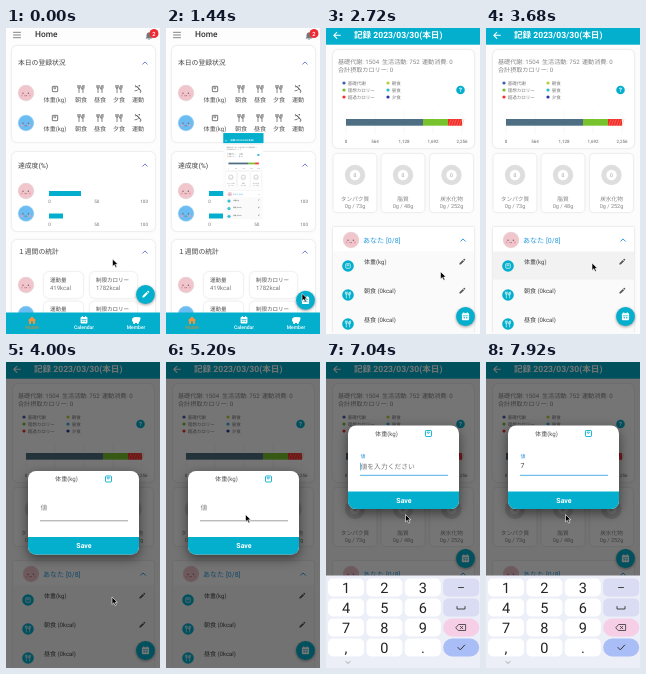
These frames come from a looping animation (154x306 px, 8 s). An HTML page:

```html
<!DOCTYPE html>
<html lang="ja">
<head>
<meta charset="utf-8">
<style>
  html, body { margin: 0; width: 100%; height: 100%; overflow: hidden; background: #fdfdfd; }
  svg { display: block; width: 100vw; height: 100vh; }
  text { font-family: Roboto, "Noto Sans CJK JP", "Noto Sans CJK", sans-serif; text-rendering: geometricPrecision; }
  .card { fill: #fff; filter: drop-shadow(0 .5px 1.2px rgba(0,0,0,.16)); }
  .sheet { fill: #fff; filter: drop-shadow(0 4px 6px rgba(0,0,0,.5)); }
  .fab { filter: drop-shadow(0 1.2px 1.5px rgba(0,0,0,.4)); }
</style>
</head>
<body>
<svg id="stage" viewBox="0 0 154 306"></svg>
<script>
const CYAN = '#03afcd', INK = '#444', GREY = '#858585', BLUE = '#2a9be0';

const text = (x, cy, str, size, fill = INK, anchor = 'start', weight = 400) =>
  `<text x="${x}" y="${cy + size * .36}" font-size="${size}" fill="${fill}" text-anchor="${anchor}" font-weight="${weight}">${str}</text>`;
const mid = (x, cy, str, size, fill, weight) => text(x, cy, str, size, fill, 'middle', weight);
const rect = (x, y, w, h, fill, r = 0) => `<rect x="${x}" y="${y}" width="${w}" height="${h}" rx="${r}" fill="${fill}"/>`;
const card = (x, y, w, h, r = 5) => `<rect class="card" x="${x}" y="${y}" width="${w}" height="${h}" rx="${r}"/>`;
const dot = (x, y, r, fill) => `<circle cx="${x}" cy="${y}" r="${r}" fill="${fill}"/>`;
const line = (d, color, w = 1) =>
  `<path d="${d}" fill="none" stroke="${color}" stroke-width="${w}" stroke-linecap="round" stroke-linejoin="round"/>`;
const at = (x, y, body, scale = 1) => `<g transform="translate(${x} ${y}) scale(${scale})">${body}</g>`;
const group = (id, body) => `<g id="${id}">${body}</g>`;

const chevron = (x, y, color) => line(`M${x - 2.3} ${y + 1.2}l2.3 -2.3l2.3 2.3`, color, 1);
const avatar = (x, y, fill, ring) => at(x, y,
  dot(0, 0, 8.2, ring) + dot(0, 0, 7.5, fill) + dot(-3, .2, .7, '#76606a') + dot(2.4, .2, .7, '#76606a') +
  dot(-4.3, 2.6, 1, '#f0a0ac') + dot(3.8, 2.6, 1, '#f0a0ac') + line('M-1.3 2.6q1 .9 2 0', '#76606a', .6));
const pinkFace = (x, y) => avatar(x, y, '#f1c5cc', '#ead6d9');
const blueFace = (x, y) => avatar(x, y, '#6bbcf1', '#aed8f4');

const icons = {
  scale: c => `<rect x="-3" y="-3" width="6" height="6" rx=".7" fill="none" stroke="${c}" stroke-width=".9"/>` +
    line('M-1.2 -1.4h2.4l-1.2 1.4z', c, .7),
  meal: c => line('M-2.2 4V-4M-3.5 -4v2.2q0 1 1.3 1t1.3 -1V-4', c, .8) + line('M2.2 4V-4q-1.6 1.2 -1.6 4h1.6M3.4 -4v3', c, .8),
  sport: c => dot(1.4, -3.6, .9, c) + line('M-3 -2.5l2.6 0l1.4 2.2l-2 2l-2.5 .3M1 -.3l1.6 1.8v2.5M-3 -4l6.5 6', c, .8),
  pencil: c => `<path d="M-3 3v-1.5l4 -4l1.5 1.5l-4 4zM1.5 -3l.7 -.7q.5 -.3 .9 .1l.5 .5q.4 .4 .1 .9l-.7 .7z" fill="${c}"/>`,
  calendar: c => rect(-3.6, -3.2, 7.2, 7, c, .8) + rect(-2.2, -4.2, 1, 1.5, c) + rect(1.2, -4.2, 1, 1.5, c) +
    rect(-2.7, -1, 5.4, .7, CYAN) + rect(-1.9, .6, 1.3, 1.3, CYAN) + rect(.6, .6, 1.3, 1.3, CYAN),
};
const icon = (name, x, y, color, scale) => at(x, y, icons[name](color), scale);

function homePage() {
  const accent = '#6b78d8';
  const labels = ['体重(kg)', '朝食', '昼食', '夕食', '運動'], xs = [49, 75, 94, 113, 132];
  const kinds = ['scale', 'meal', 'meal', 'meal', 'sport'];
  const statusRow = dy => labels.map((s, i) =>
    icon(kinds[i], xs[i], 61 + dy, '#555', .9) + mid(xs[i], 72 + dy, s, 6.1, '#555')).join('');
  const goal = (y, w) => rect(43, y - 1, w, 5, CYAN) +
    [0, 50, 100].map((n, i) => mid(43.5 + i * 47.3, y + 9.5, n, 4.6, '#777')).join('');
  const stat = (x, y, w, name, value) =>
    card(x, y - 8, w, 26, 5) + text(x + 6, y, name, 5.5, '#555') + text(x + 6, y + 8.3, value, 6, '#777');
  const statRow = y => stat(38, y, 39, '運動量', '419kcal') + stat(84, y, 47, '制限カロリー', '1782kcal');
  const tab = (x, name, art, color) => art + mid(x, 299.5, name, 5, color, 500);
  return rect(0, 0, 154, 306, '#fdfdfd') +
    line('M7.5 4.3h7M7.5 7h7M7.5 9.7h7', '#777', .9) + text(29, 6.2, 'Home', 8.4, '#333', 'start', 500) +
    `<path d="M139.5 10.5l1 -1.2v-2.5q.3 -2.3 2.5 -2.6q2.2 .3 2.5 2.6v2.5l1 1.2zM142 11h2q-1 1.6 -2 0z" fill="#777"/>` +
    dot(148, 5.5, 4.5, '#ee2a34') + mid(148, 5.5, '2', 5.8, '#fff', 500) +
    card(6, 18, 143, 96) + text(12, 35, '本日の登録状況', 6.8) + chevron(139, 35, accent) +
    pinkFace(20, 65) + statusRow(0) + blueFace(20, 95) + statusRow(29) +
    card(6, 124, 143, 79) + text(12, 137.5, '達成度(%)', 6.8) + chevron(139, 137, accent) +
    pinkFace(20, 163) + goal(164, 32) + blueFace(20, 185.5) + goal(186.5, 14) +
    card(6, 212, 143, 110) + text(12, 224, '１週間の統計', 6.8) + chevron(139, 224, accent) +
    pinkFace(20, 257) + statRow(252) + blueFace(20, 286) + statRow(281.5) +
    rect(0, 284.5, 154, 22, CYAN) +
    tab(26, 'Home', `<path d="M21.8 292.5l4.2 -4l4.2 4h-1.2v3.4h-2v-2.3h-2v2.3h-2v-3.4z" fill="#f0943c"/>`, '#c98a3e') +
    tab(78, 'Calendar', icon('calendar', 78, 292, '#fff', .95), '#fff') +
    tab(130, 'Member', `<ellipse cx="130" cy="292" rx="4" ry="3" fill="#fff"/>` + rect(127.3, 293, 1.6, 3, '#fff') +
      rect(131, 293, 1.6, 3, '#fff') + dot(133, 290.5, 1.6, '#fff'), '#fff');
}

function recordPage() {
  const legend = (x, y, name, color) => dot(x, y, 1.6, color) + text(x + 3.7, y, name, 4.5, '#777');
  const nutrient = (x, name, amount) => card(x - 21.5, 126, 43, 58, 4) +
    `<circle cx="${x}" cy="147" r="7.7" fill="none" stroke="#dedede" stroke-width="5"/>` +
    mid(x, 147, '0', 5, '#999') + mid(x, 171, name, 5.7, GREY) + mid(x, 178.3, amount, 5.5, GREY);
  const entry = (y, name, kind) => dot(22, y + 4, 5.8, CYAN) + icon(kind, 22, y + 4, '#fff', .75) +
    text(38, y, name, 6, INK) + icon('pencil', 136, y, '#555', .85);
  const ticks = ['0', '564', '1,128', '1,692', '2,256'];
  let hatch = '';
  for (let x = 123; x < 136; x += 2.6) hatch += line(`M${x} 97l2 -5.4`, '#ff9a94', .5);
  // The page begins above the visible stage, behind the status bar.
  return rect(0, -22, 154, 328, '#fcfcfc') + rect(0, -22, 154, 38.7, CYAN) +
    line('M14.3 7.3h-6.4M10.8 4.3l-3 3l3 3', '#fff', 1.1) + text(28, 7.1, '記録 2023/03/30(本日)', 8.6, '#fff', 'start', 700) +
    card(7, 22, 141, 98) +
    text(12, 33.5, '基礎代謝: 1504', 6.1, GREY) + text(56, 33.5, '生活活動: 752', 6.1, GREY) +
    text(96, 33.5, '運動消費: 0', 6.1, GREY) + text(12, 42, '合計摂取カロリー: 0', 6.1, GREY) +
    legend(18, 55, '基礎代謝', '#3f5fa8') + legend(18, 62, '理想カロリー', '#72bd2f') + legend(18, 69, '超過カロリー', '#f03030') +
    legend(62, 55, '朝食', '#b9cf3a') + legend(62, 62, '昼食', '#27b5d8') + legend(62, 69, '夕食', '#2637a8') +
    dot(134.5, 62, 4.3, CYAN) + mid(134.5, 62.1, '?', 6, '#fff', 700) +
    ticks.map((s, i) => line(`M${20 + i * 29} 83v23`, '#eee', .5) + mid(20 + i * 29, 113, s, 4.5, '#666')).join('') +
    rect(20, 91, 77, 6.7, '#4e6e84') + rect(97, 91, 25, 6.7, '#78c22e') + rect(122, 91, 14, 6.7, '#f22b25') + hatch +
    nutrient(29, 'タンパク質', '0g / 73g') + nutrient(77, '脂質', '0g / 48g') + nutrient(125.5, '炭水化物', '0g / 252g') +
    card(7, 199, 141, 106, 0) + rect(7, 223.5, 141, 82.5, '#fafafa') + group('press', rect(7, 223.5, 141, 28, '#000')) +
    pinkFace(25, 212) + text(37, 212, 'あなた', 7, BLUE) + text(60, 212, '[0/8]', 7, BLUE) + chevron(137, 212, BLUE) +
    entry(234, '体重(kg)', 'scale') + entry(263, '朝食 (0kcal)', 'meal') + entry(292, '昼食 (0kcal)', 'meal');
}

function dialogBox() {
  return `<rect class="sheet" x="22" y="109" width="111" height="83.5" rx="8"/>` +
    `<path d="M22 175h111v9.5a8 8 0 0 1 -8 8h-95a8 8 0 0 1 -8 -8z" fill="${CYAN}"/>` +
    mid(60.5, 117, '体重(kg)', 6.1, '#555') + icon('scale', 102.5, 117, CYAN, 1) +
    group('idle', text(34.5, 146, '値', 6.8, GREY)) +
    group('active', text(34.5, 139.5, '値', 5, BLUE)) +
    group('hint', text(34.5, 150, '値を入力ください', 6.8, '#777') + rect(34, 146.3, .7, 7.5, BLUE)) +
    group('typed', text(34.5, 149.3, '7', 7, INK)) +
    `<path id="underline" d="M34 158.8h88" stroke-width=".8"/>` +
    mid(78, 183.5, 'Save', 7, '#fff', 700);
}

function keyboard() {
  const rows = ['123–', '456␣', '789⌫', ',0.✓'];
  const special = ['#d9dcf3', '#d9dcf3', '#f6cfe6', '#a9bdf7'];
  const art = [
    line('M132.5 0h5', '#333', .9),
    line('M131 -1v2.5h8v-2.5', '#333', .9),
    line('M130 0l2.6 -3h7v6h-7zM134.3 -1.2l2.5 2.5M136.8 -1.2l-2.5 2.5', '#333', .8),
    line('M132 0l2.3 2.4l4.3 -4.8', '#333', 1),
  ];
  const keys = rows.map((row, r) => at(0, 225.5 + r * 20, [...row].map((ch, c) => {
    const x = 20 + c * 38.4;
    return rect(x - 18, -9, 36, 18, c == 3 ? special[r] : '#fff', c == 3 && r > 1 ? 9 : 5) +
      (c == 3 ? art[r] : mid(x, 0, ch, 14.5, '#222'));
  }).join(''))).join('');
  return rect(0, 213.5, 154, 95, '#eceef8') + group('keyCaps', keys) + line('M20 299.5l2 2l2 -2', '#888', .7);
}

const stage = document.getElementById('stage');
stage.innerHTML = homePage() + group('record', recordPage()) +
  group('fab', `<circle class="fab" r="9.4" fill="${CYAN}"/>` +
    group('edit', icons.pencil('#fff')) + group('dates', icons.calendar('#fff'))) +
  group('shade', rect(0, 0, 154, 306, '#000')) + group('dialog', dialogBox()) + group('keys', keyboard()) +
  group('cursor', `<path d="M0 0v7.4l1.8 -1.6l1.3 2.8l1.3 -.6l-1.3 -2.7h2.3z" fill="#000" stroke="#fff" stroke-width=".6"/>`);
const el = Object.fromEntries([...stage.querySelectorAll('[id]')].map(n => [n.id, n]));

const LOOP = 8000;
const progress = (t, from, to) => Math.min(1, Math.max(0, (t - from) / (to - from)));
const easeOut = p => 1 - (1 - p) ** 3;
const smooth = p => p * p * (3 - 2 * p);
// CSS "ease": solve the bezier's x for its parameter, then read y.
function ease(p) {
  let lo = 0, hi = 1;
  for (let i = 0; i < 20; i++) {
    const u = (lo + hi) / 2, x = .75 * u * (1 - u) + u ** 3;
    if (x < p) lo = u; else hi = u;
  }
  const u = hi;
  return .3 * u * (1 - u) ** 2 + 3 * u * u * (1 - u) + u ** 3;
}

// start, end, x, y
const cursorMoves = [[0, 1, 106.5, 231], [640, 1120, 136, 265.5], [2300, 2950, 106, 235], [4050, 4700, 79.5, 152.5]];
const move = (node, x, y) => node.setAttribute('transform', `translate(${x} ${y})`);
const show = (node, opacity) => {
  node.style.opacity = opacity;
  node.style.display = opacity > 0 ? '' : 'none';
};

function draw(t) {
  const opening = progress(t, 1280, 2150);
  const zoom = ease(opening);
  show(el.record, opening > 0 ? 1 : 0);
  el.record.setAttribute('transform', `translate(${77.5 * (1 - zoom)} ${150 * (1 - zoom)}) scale(${zoom})`);
  show(el.edit, opening > 0 ? 0 : 1);
  show(el.dates, opening > 0 ? 1 : 0);
  show(el.press, t > 3600 && t < 3900 ? .03 : 0);

  const opened = smooth(progress(t, 3700, 3900));
  show(el.shade, opened * .54);
  show(el.dialog, opened);

  const focus = progress(t, 6480, 6620), typed = t >= 7600;
  show(el.idle, 1 - focus);
  show(el.active, focus);
  show(el.hint, typed ? 0 : focus);
  show(el.typed, typed ? 1 : 0);
  el.underline.setAttribute('stroke', focus > 0 ? BLUE : '#888');

  const lift = easeOut(progress(t, 6680, 6960));
  move(el.dialog, 0, -45.5 * lift);
  move(el.fab, 139.5, 266.5 + 22 * zoom - 92 * lift);

  const rise = easeOut(progress(t, 6595, 6915));
  show(el.keys, rise > 0 ? 1 : 0);
  el.keyCaps.style.opacity = Math.min(1, .4 + rise * .7);
  move(el.keys, 0, 92 * (1 - rise));

  let [, , x, y] = cursorMoves[0];
  for (const [from, to, nx, ny] of cursorMoves.slice(1)) {
    const p = smooth(progress(t, from, to));
    x += (nx - x) * p;
    y += (ny - y) * p;
  }
  move(el.cursor, x, y);
}

const start = performance.now();
function tick() {
  draw((performance.now() - start) % LOOP);
  requestAnimationFrame(tick);
}
tick();
</script>
</body>
</html>
```
